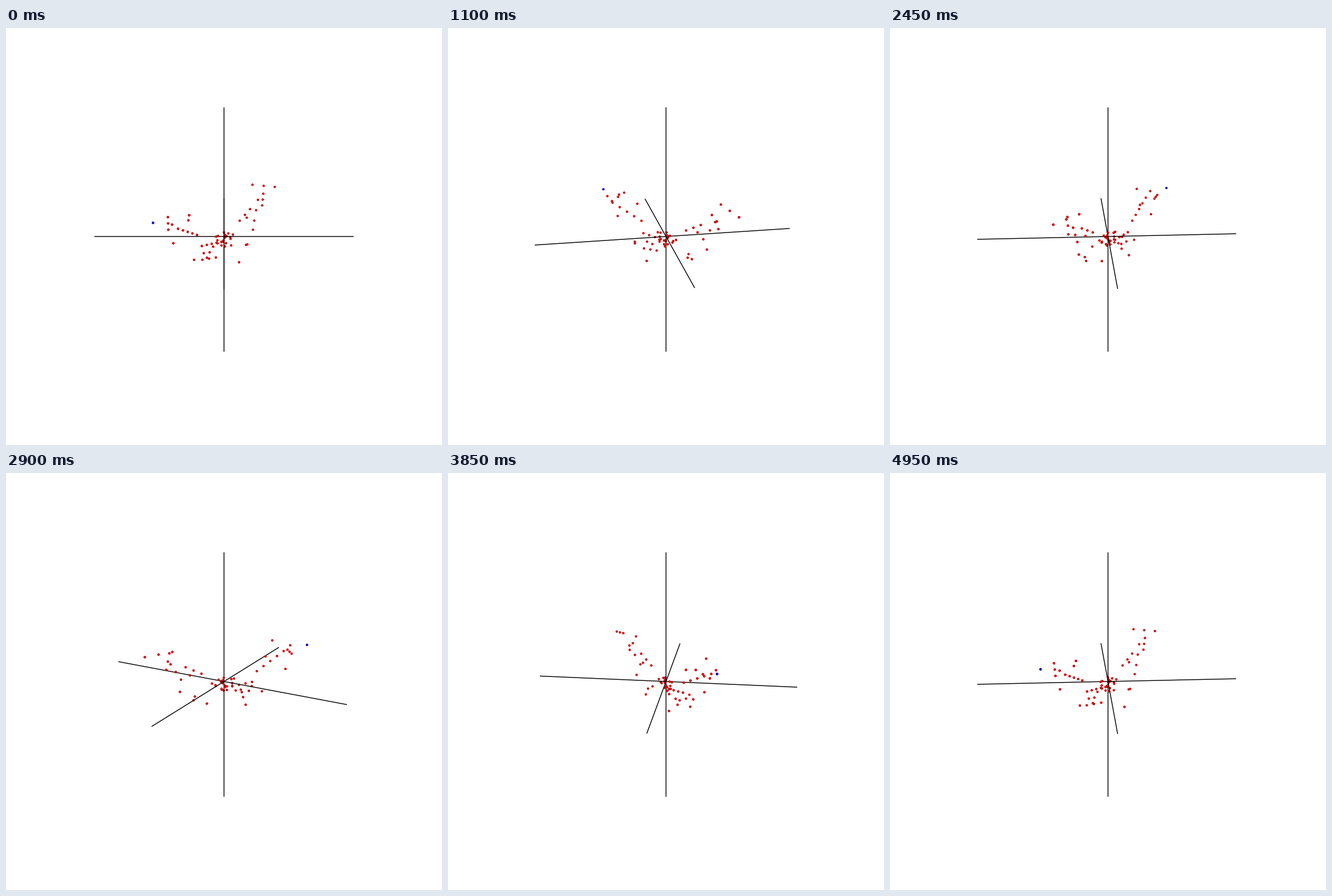
A matplotlib script that plays this animation: 765 px wide and 732 px high, repeating every 5 s.

```python
import numpy as np
import matplotlib.pyplot as plt
from matplotlib.animation import FuncAnimation

W, H, DPI = 765, 732, 96
FRAMES, INTERVAL = 100, 50
PT = 72 / DPI                     # points per pixel
DIST = (H / 2) / np.tan(np.radians(15))
TILT = np.radians(20)
AXIS = 227.5
LINE, DOT, RIM = 1.45, 3.6, 0.7   # pixels


def strand(start, end, count):
    """Evenly spaced dots; x right, y up, z towards the viewer."""
    return np.linspace(start, end, count)


def core(count, spread=7):
    """Dense middle: a loose band along the falling x-z diagonal."""
    rng = np.random.default_rng(4)
    along, up, off = rng.normal(0, spread, (3, count))
    return np.stack([along, up - 3, off / 4 - 0.9 * along], axis=1)


points = np.vstack([
    # arm rising to the back right
    strand((52, 70, -84), (94, 60, -104), 3),
    strand((71, 59, -64), (70, 33, -76), 3),
    strand((62, 44, -75), (55, 11, -54), 3),
    strand((47, 34, -51), (28, 19, -30), 3),
    strand((41, 19, -47), (53, -9, -61), 2),
    # arm rising to the front left
    strand((-93, 56, 60), (-91, 42, 83), 3),
    strand((-57, 64, 74), (-84, 54, 92), 2),
    strand((-60, 44, 41), (-84, 15, 74), 2),
    strand((-75, 44, 84), (-46, 16, 36), 5),
    # low part
    strand((-51, -25, 48), (-19, -16, 8), 3),
    strand((-38, -5, 34), (-13, -9, 7), 4),
    strand((-29, -20, 51), (-25, -22, 20), 2),
    strand((-14, -25, 37), (-38, -40, 10), 3),
    strand((26, -33, 39), (13, -31, -38), 2),
    strand((40, -30, -38), (42, -26, -30), 2),
    core(19),
    [(-114.5, 58.3, 95.7)],       # the blue dot
])
is_blue = np.arange(len(points)) == len(points) - 1
faces = np.where(is_blue[:, None], (0, 0, 0.92), (0.94, 0, 0))
edges = np.where(is_blue[:, None], (0, 0, 0.6), (0.65, 0, 0))


def spin(p, angle):
    x, y, z = np.asarray(p, float).T
    c, s = np.cos(angle), np.sin(angle)
    return np.stack([x * c - z * s, y, x * s + z * c], axis=1)


def project(p):
    """Screen positions and perspective scale of already turned points."""
    x, y, z = p.T
    c, s = np.cos(TILT), np.sin(TILT)
    scale = DIST / (DIST - (y * s + z * c))
    pos = np.stack([W / 2 + scale * x, H / 2 - scale * (y * c - z * s)], axis=1)
    return pos, scale


fig = plt.figure(figsize=(W / DPI, H / DPI), dpi=DPI, facecolor="white")
ax = fig.add_axes([0, 0, 1, 1])
ax.set_xlim(0, W)
ax.set_ylim(H, 0)
ax.axis("off")


def add_line(ends, zorder):
    pos, _ = project(np.array(ends, float))
    return ax.plot(*pos.T, color="black", lw=LINE * PT, zorder=zorder,
                   solid_capstyle="butt", snap=False)[0]


def add_dots(zorder):
    return ax.scatter([], [], linewidths=RIM * PT, zorder=zorder)


# Back to front: low dots behind, lower pole, low dots in front,
# level axes, high dots behind, upper pole, high dots in front.
layers = {(False, False): add_dots(1), (False, True): add_dots(3),
          (True, False): add_dots(5), (True, True): add_dots(7)}
add_line([(0, 0, 0), (0, -AXIS, 0)], 2)
add_line([(0, 0, 0), (0, AXIS, 0)], 6)
level_ends = [[(-AXIS, 0, 0), (AXIS, 0, 0)], [(0, 0, -AXIS), (0, 0, AXIS)]]
level_lines = [add_line(ends, 4) for ends in level_ends]


def update(i):
    angle = 2 * np.pi * i / FRAMES
    for line, ends in zip(level_lines, level_ends):
        line.set_data(*project(spin(ends, angle))[0].T)

    turned = spin(points, angle)
    pos, scale = project(turned)
    order = np.argsort(scale)
    high, near = turned[order, 1] > 0, turned[order, 2] > 0
    for (up, front), dots in layers.items():
        idx = order[(high == up) & (near == front)]
        dots.set_offsets(pos[idx])
        dots.set_sizes((DOT * PT * scale[idx]) ** 2)
        dots.set_facecolor(faces[idx])
        dots.set_edgecolor(edges[idx])
    return [*level_lines, *layers.values()]


anim = FuncAnimation(fig, update, frames=FRAMES, interval=INTERVAL,
                     repeat=True, repeat_delay=0, blit=False)
plt.show()
```
